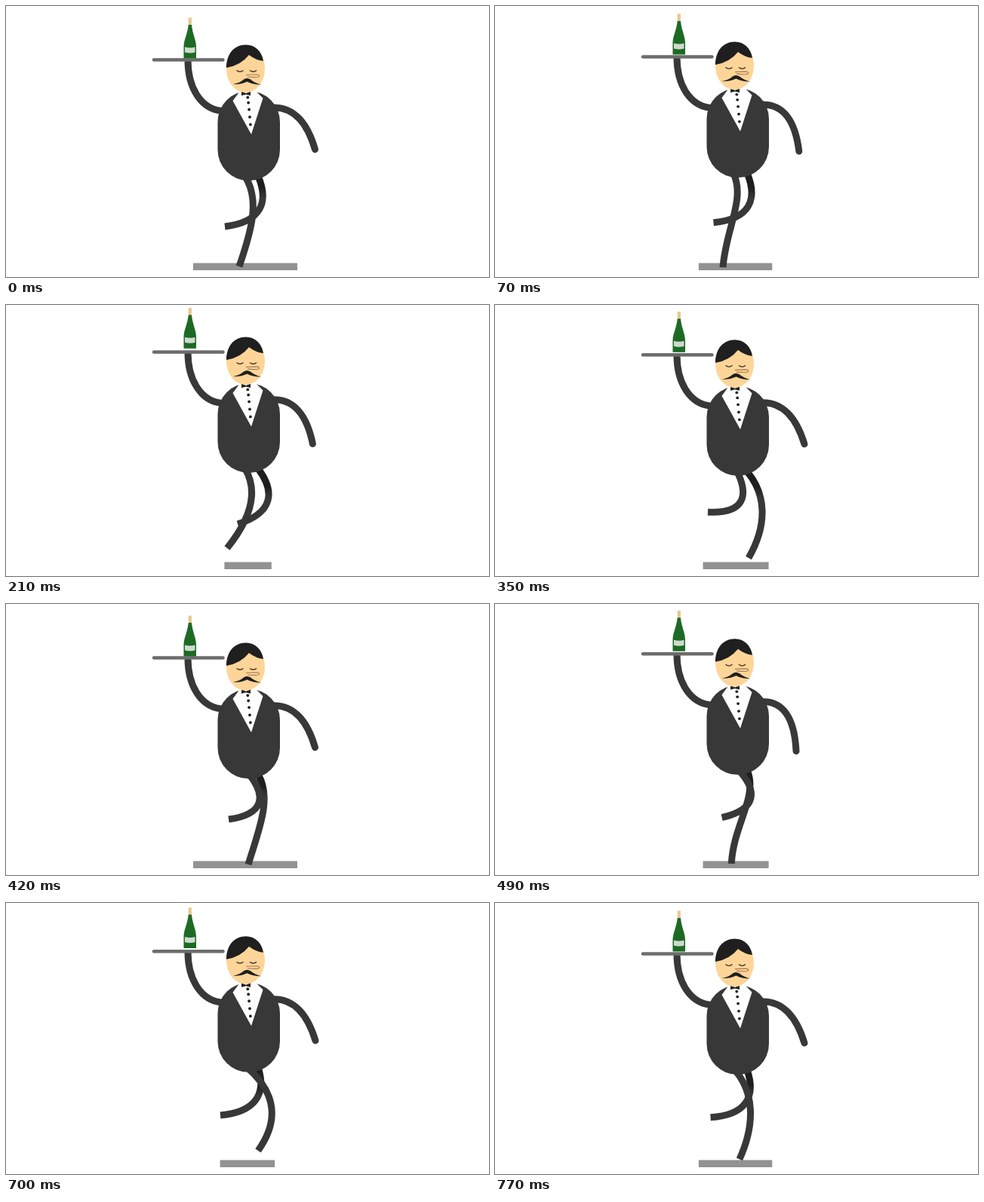
These frames come from a looping animation (640 by 360 pixels, 840 ms). An HTML page:

```html
<!DOCTYPE html>
<html lang="en">
<head>
<meta charset="utf-8">
<title>Waiter</title>
<style>
  html, body { margin: 0; width: 100%; height: 100%; overflow: hidden; background: #fff; }
  svg { display: block; width: 100%; height: 100%; }
  .limb { fill: none; stroke: #383838; stroke-width: 9; }
</style>
</head>
<body>
<svg viewBox="0 0 640 360">
  <defs>
    <linearGradient id="shade" gradientUnits="userSpaceOnUse" x1="0" y1="224" x2="0" y2="256">
      <stop offset=".55" stop-color="#1e1e1e"/>
      <stop offset="1" stop-color="#383838"/>
    </linearGradient>
  </defs>
  <rect id="shadow" y="341.5" height="9.5" fill="#929292"/>
  <path id="legB" class="limb" style="stroke:url(#shade)"/>
  <path id="legA" class="limb"/>
  <g id="torso">
    <path id="arm" class="limb" stroke-linecap="round"/>
    <path class="limb" d="M241 72C241 108 258 138 288 139.5"/>
    <rect x="280.500" y="113" width="82.500" height="119" rx="41" fill="#383838"/>
    <path d="M310 113L300.500 126L325 170.500L340.500 122.500L331 113Z" fill="#fff"/>
    <g id="buttons" fill="#222"></g>
    <path d="M312 113.500L318 116L324 113.500V119L318 117.500L312 119Z" fill="#222"/>
    <ellipse cx="317.500" cy="83.500" rx="25.500" ry="31.500" fill="#fdd598"/>
    <path d="M292 82C292 64 302 51.500 318 51.500C330 51.500 339 60 341 73Q331 72 322 65Q311 79 292 82Z" fill="#1f1f1f"/>
    <path d="M305.500 85.500Q310 89 314.500 85.500M323 85.500Q327.500 89 332 85.500" fill="none" stroke="#3a2d22" stroke-width="1.300"/>
    <path d="M318 91.500Q326 91 333 91Q336 91.500 335.500 93.500Q334 95.500 320 94" fill="none" stroke="#a87c55" stroke-width="1.200"/>
    <path d="M301 104Q310 102 315 97.500Q319 94.500 324 97.500Q329 102 338.500 104.500Q327 104.500 319.500 100.500Q311 104.500 301 104Z" fill="#1f1f1f"/>
    <path d="M196 71.500H287.500" stroke="#6c6c6c" stroke-width="4.400" stroke-linecap="round"/>
    <g id="bottle">
      <rect x="241.700" y="15.500" width="4.200" height="10" fill="#e7c78f"/>
      <path d="M241.700 25H246C247 37 252 45 252 54V69.500H235.500V54C235.500 45 240.700 37 241.700 25Z" fill="#1d6a24"/>
      <path d="M237 54.500Q244 56.500 250.500 54.500V61.500Q244 63.500 237 61.500Z" fill="#cfdacf"/>
    </g>
  </g>
</svg>
<script>
  const STEP = 70, STEPS = 12;
  const { PI, sin, cos, abs, min, floor, hypot, sqrt } = Math;

  // Foot paths over one stride: step, x, y.
  const footA = [[0, 309, 346], [2, 297, 343], [3, 293, 323], [5, 282, 275], [6, 295, 286], [8, 307, 285], [10, 334, 329]];
  const footB = [[0, 290, 293], [2, 291, 282], [3, 307, 291], [5, 336, 336], [6, 321, 346], [8, 306, 336], [10, 284, 282]];

  const $ = id => document.getElementById(id);
  const set = (id, attrs) => {
    for (const name in attrs) $(id).setAttribute(name, attrs[name]);
  };
  const curve = (...p) => `M${p.slice(0, 2).join(' ')}C${p.slice(2).join(' ')}`;

  $('buttons').innerHTML = [121.5, 128.5, 137.5, 147.5, 157.5]
    .map((y, i) => `<circle cx="${320.3 + i * 0.9}" cy="${y}" r="1.9"/>`).join('');

  // Point at a step on a smooth closed path.
  function along(path, step) {
    const n = path.length;
    const at = i => {
      const turn = floor(i / n), [t, x, y] = path[i - turn * n];
      return [t + turn * STEPS, x, y];
    };
    let i = n - 1;
    while (path[i][0] > step) i--;
    const [a, b, c, d] = [i - 1, i, i + 1, i + 2].map(at);
    const span = c[0] - b[0], u = (step - b[0]) / span, w = 1 - u;
    return [1, 2].map(k => {
      const m = (c[k] - a[k]) / (c[0] - a[0]) * span;
      const e = (d[k] - b[k]) / (d[0] - b[0]) * span;
      return b[k] * w * w * (1 + 2 * u) + m * u * w * w
        + c[k] * u * u * (3 - 2 * u) - e * u * u * w;
    });
  }

  // Rubber-hose leg: the closer the foot to the hip, the more the knee bulges.
  function leg(x, y, [fx, fy]) {
    const dx = fx - x, dy = fy - y, len = hypot(dx, dy);
    const slack = sqrt(140 * 140 - len * len);
    const point = (u, v) => [x + u * dx + v * dy / len, y + u * dy - v * dx / len];
    const thigh = 7 + 0.2 * slack;
    const shin = min(40, 1.1 * slack - 63 + 0.6 * dx);
    return curve(x, y, ...point(0.25, thigh), ...point(0.6, shin), fx, fy);
  }

  function draw(step) {
    // Two bounces per stride, the second a little ahead of the first.
    const bounce = step / 6 - 0.05 * sin(PI * step / 6);
    const lift = 9.15 * abs(sin(PI * bounce));
    const swing = cos(PI * (bounce - 0.27)) ** 8;
    const half = 69 - 5.9 * lift + 0.19 * lift * lift;
    const hip = 320 - 4 * cos(PI * (step - 1.5) / 6);

    set('shadow', { x: 317 + 0.4 * lift - half, width: 2 * half });
    set('torso', { transform: `translate(0 ${-lift})` });
    set('bottle', { transform: `translate(0 ${-0.3 * lift})` });
    set('arm', { d: curve(352, 135, 382, 133, 400 - 4 * swing, 157, 410 - 14 * swing, 190 + 13.5 * swing) });
    set('legA', { d: leg(hip, 227 - lift, along(footA, step)) });
    set('legB', { d: leg(334.5, 227 - lift, along(footB, step)) });
  }

  function tick() {
    draw(floor(performance.now() / STEP) % STEPS);
    requestAnimationFrame(tick);
  }
  tick();
</script>
</body>
</html>
```
